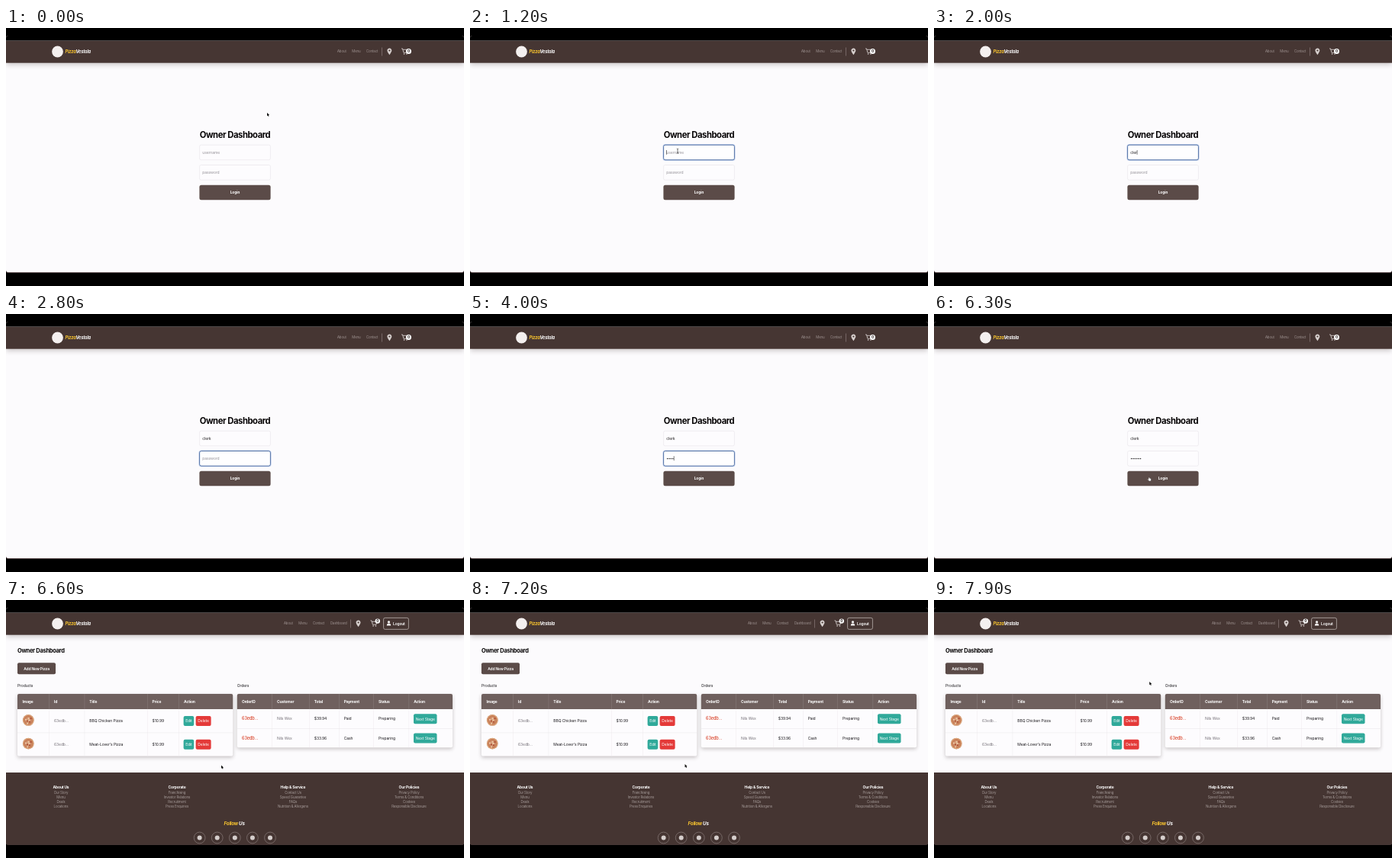
These frames come from a looping animation (600 px wide and 338 px high, 8 s). An HTML page with a canvas:

```html
<!DOCTYPE html>
<html lang="en">
<head>
<meta charset="utf-8">
<title>Pizza shop dashboard</title>
<style>
html, body { margin: 0; width: 100%; height: 100%; overflow: hidden; background: #000; }
canvas { display: block; width: 100vw; height: 100vh; }
</style>
</head>
<body>
<canvas id="stage"></canvas>
<script>
const W = 600, H = 338, LOOP = 8000;
const canvas = document.getElementById('stage');
const ctx = canvas.getContext('2d');
const ratio = window.devicePixelRatio || 1;
canvas.width = W * ratio;
canvas.height = H * ratio;

const PAPER = '#fcfbfd', BROWN = '#463633', BUTTON = '#5b4b48', HEAD = '#6f605e';
const YELLOW = '#fbc62f', TEAL = '#30a99a', RED = '#e43a39', SOFT = '#b9afad';

// Timeline, in ms
const FOCUS_USER = 1000, FOCUS_PASS = 2300, BLUR = 6200, PAGE_CHANGE = 6600;
const USER = 'clerk';
const USER_KEYS = [1500, 1700, 1800, 2000, 2100];
const PASS_KEYS = [3200, 3500, 3800, 4000, 4300, 5200];
const BLINKS = [FOCUS_USER, ...USER_KEYS, FOCUS_PASS, ...PASS_KEYS.slice(0, 5), 5300];
const MOVES = [
  { from: 100, to: 900, a: [342, 111], b: [272, 161] },
  { from: 5600, to: 6200, a: [272, 161], b: [282, 216.5] },
  { from: 7200, to: 7900, a: [281.5, 215], b: [282.2, 107] }
];

const typed = (keys, t) => keys.filter(k => k <= t).length;

function rect(x, y, w, h, color) {
  ctx.fillStyle = color;
  ctx.fillRect(x, y, w, h);
}

function box(x, y, w, h, r, fill, stroke, line = 0.5) {
  ctx.beginPath();
  ctx.roundRect(x, y, w, h, r);
  if (fill) { ctx.fillStyle = fill; ctx.fill(); }
  if (stroke) { ctx.strokeStyle = stroke; ctx.lineWidth = line; ctx.stroke(); }
}

function disc(x, y, r, fill, stroke, line = 0.5) {
  ctx.beginPath();
  ctx.arc(x, y, r, 0, Math.PI * 2);
  if (fill) { ctx.fillStyle = fill; ctx.fill(); }
  if (stroke) { ctx.strokeStyle = stroke; ctx.lineWidth = line; ctx.stroke(); }
}

function path(points, fill, stroke, line = 0.6) {
  ctx.beginPath();
  points.forEach(([x, y], i) => i ? ctx.lineTo(x, y) : ctx.moveTo(x, y));
  if (fill) { ctx.closePath(); ctx.fillStyle = fill; }
  if (stroke) { ctx.strokeStyle = stroke; ctx.lineWidth = line; ctx.stroke(); }
  if (fill) ctx.fill();
}

// Draws text and returns its width
function text(s, x, y, color, { size = 5, weight = 400, align = 'left', italic = false } = {}) {
  ctx.font = `${italic ? 'italic ' : ''}${weight} ${size}px Inter, sans-serif`;
  ctx.letterSpacing = `${-size * (weight > 500 ? 0.04 : 0.02)}px`;
  ctx.textAlign = align;
  ctx.fillStyle = color;
  ctx.fillText(s, x, y);
  return ctx.measureText(s).width;
}

function withShadow(blur, dy, alpha, draw) {
  ctx.save();
  ctx.shadowColor = `rgba(40, 25, 25, ${alpha})`;
  ctx.shadowBlur = blur * ratio;
  ctx.shadowOffsetY = dy * ratio;
  draw();
  ctx.restore();
}

function pin(x, y) {
  ctx.beginPath();
  ctx.arc(x, y - 1.2, 2.9, Math.PI * 0.88, Math.PI * 0.12);
  ctx.quadraticCurveTo(x + 1.8, y + 2, x, y + 4.5);
  ctx.quadraticCurveTo(x - 1.8, y + 2, x - 2.8, y);
  ctx.fillStyle = '#d8d1cf';
  ctx.fill();
  disc(x, y - 1.2, 1.1, BROWN);
}

function cart(x, y) {
  path([[x, y], [x + 1.5, y], [x + 2.9, y + 5.2], [x + 7.5, y + 5.2], [x + 8.5, y + 1.3], [x + 2, y + 1.3]], null, '#e4dedc', 0.8);
  disc(x + 3.6, y + 7, 0.8, '#e4dedc');
  disc(x + 6.9, y + 7, 0.8, '#e4dedc');
}

function badge(x, y, r) {
  disc(x, y, r, '#fff');
  text('0', x, y + 1.7, '#2b2120', { size: 4.7, weight: 700, align: 'center' });
}

function header(signedIn) {
  withShadow(7, 2, 0.28, () => rect(0, 16.5, W, 29.2, BROWN));
  rect(0, 0, W, 16.5, '#000');
  disc(67.5, 31, 7.4, '#f4f0ef');
  const brand = { size: 5.65, weight: 700, italic: true };
  const w = text('Pizza', 77.5, 33, YELLOW, brand);
  text('Vestola', 77.5 + w, 33, '#fff', brand);

  const shift = signedIn ? -70 : 0;
  const nav = { size: 4.4, weight: 300 };
  [['About', 434], ['Menu', 453.3], ['Contact', 472]].forEach(([s, x]) => text(s, x + shift, 32.4, SOFT, nav));
  if (signedIn) text('Dashboard', 425, 32.4, SOFT, nav);
  const line = signedIn ? 451.2 : 492;
  rect(line, 25.5, 0.6, 11, '#948886');
  pin(line + 10.4, 30.7);
  cart(signedIn ? 477.5 : 518, 27);
  if (!signedIn) return badge(527.5, 30.6, 3.5);
  badge(486.8, 27.6, 3.2);
  box(494.6, 23.4, 32.8, 15, 2, null, '#ded8d6', 0.6);
  disc(501.5, 28.9, 1.6, '#fff');
  box(498.8, 30.9, 5.4, 2.7, [2, 2, 0.5, 0.5], '#fff');
  text('Logout', 507, 32.7, '#fff', { weight: 600 });
}

function field(y, focused) {
  if (focused) {
    box(253.3, y - 0.2, 93.4, 20, 2.6, null, 'rgba(80, 125, 210, .3)', 1.8);
    box(253.6, y, 92.8, 19.6, 2.3, '#fefeff', '#40639b', 0.9);
  } else {
    box(253.6, y, 92.8, 19.6, 2, '#fdfcfe', '#e6e3e8', 0.6);
  }
}

function login(t) {
  const onUser = t >= FOCUS_USER && t < FOCUS_PASS;
  const onPass = t >= FOCUS_PASS && t < BLUR;
  const name = USER.slice(0, typed(USER_KEYS, t));
  const dots = typed(PASS_KEYS, t);
  header(false);
  text('Owner Dashboard', 300, 144.4, '#080607', { size: 11.25, weight: 700, align: 'center' });
  field(153.2, onUser);
  field(179.5, onPass);

  const nameWidth = text(name || 'username', 257.3, 164.8, name ? '#1c1a1c' : '#97949a');
  if (!dots) text('password', 257.3, 191, '#97949a');
  for (let i = 0; i < dots; i++) disc(258.6 + i * 2.38, 189.4, 0.75, '#1c1a1c');

  const last = BLINKS.filter(b => b <= t).pop();
  if ((onUser || onPass) && (t - last) % 1000 < 500) {
    const x = 257.3 + (onUser ? (name ? nameWidth : 0) : dots * 2.38);
    rect(x, onUser ? 160 : 186.2, 0.6, 5.8, '#222');
  }
  box(253.4, 205.7, 93.2, 19.6, 2.5, BUTTON);
  text('Login', 300, 217.4, '#fff', { weight: 700, align: 'center' });
}

function pizza(x, y) {
  const g = ctx.createRadialGradient(x, y, 1, x, y, 7.6);
  g.addColorStop(0, '#d9a07c');
  g.addColorStop(0.7, '#c57a54');
  g.addColorStop(0.85, '#e0ab7c');
  g.addColorStop(1, '#b9744f');
  disc(x, y, 7.4, g);
  for (let i = 0; i < 7; i++) {
    const a = i * 2.4, r = 1.2 + i * 0.55;
    disc(x + Math.cos(a) * r, y + Math.sin(a) * r, 1, i % 2 ? '#a9482f' : '#efd0ae');
  }
}

function pill(s, x, y, w, color) {
  box(x, y, w, 13, 2, color);
  text(s, x + w / 2, y + 8.3, '#fff', { align: 'center' });
}

function table(x, cols, heads, rowH) {
  const h = 20 + rowH * 2;
  withShadow(5, 2, 0.25, () => box(x, 123, 282.2, h, 2, '#fdfcfe'));
  box(x, 123, 282.2, 20, [2, 2, 0, 0], HEAD);
  cols.slice(1).forEach(c => {
    rect(c - 6.6, 123, 0.5, 20, '#8b7f7d');
    rect(c - 6.6, 143, 0.5, rowH * 2, '#eeebef');
  });
  rect(x, 143 + rowH, 282.2, 0.5, '#e6e3e7');
  heads.forEach((s, i) => text(s, cols[i], 134.9, '#fff', { weight: 700 }));
}

function products() {
  const cols = [21.6, 63.1, 109.3, 191.6, 233];
  table(15, cols, ['Image', 'Id', 'Title', 'Price', 'Action'], 30.7);
  ['BBQ Chicken Pizza', "Meat-Lover's Pizza"].forEach((s, i) => {
    const y = 158.4 + i * 30.7;
    pizza(29.3, y - 1);
    text('63edb...', cols[1], y + 1.8, '#77737a');
    text(s, cols[2], y + 1.8, '#18161a');
    text('$10.99', cols[3], y + 1.8, '#18161a');
    pill('Edit', 232.6, y - 6.4, 13.6, TEAL);
    pill('Delete', 248.6, y - 6.4, 20, RED);
  });
}

function orders() {
  const cols = [309, 354.9, 403.8, 442.7, 488, 534.2];
  table(302.8, cols, ['OrderID', 'Customer', 'Total', 'Payment', 'Status', 'Action'], 25.1);
  [['$39.94', 'Paid'], ['$33.96', 'Cash']].forEach(([total, pay], i) => {
    const y = 155.6 + i * 25.2;
    text('63edb...', cols[0], y + 1.8, '#d9452c', { size: 5.6, weight: 500 });
    text('Nils Wex', cols[1], y + 1.8, '#77737a');
    [total, pay, 'Preparing'].forEach((s, k) => text(s, cols[k + 2], y + 1.8, '#18161a'));
    pill('Next Stage', 534, y - 6.4, 30.5, TEAL);
  });
}

function footer() {
  rect(0, 226, W, 94.6, '#453532');
  const groups = [
    ['About Us', 'Our Story', 'Menu', 'Deals', 'Locations'],
    ['Corporate', 'Franchising', 'Investor Relations', 'Recruitment', 'Press Enquiries'],
    ['Help & Service', 'Contact Us', 'Speed Guarantee', 'FAQs', 'Nutrition & Allergens'],
    ['Our Policies', 'Privacy Policy', 'Terms & Conditions', 'Cookies', 'Responsible Disclosure']
  ];
  groups.forEach(([title, ...links], i) => {
    const x = 72 + i * 152;
    text(title, x, 246.8, '#fff', { weight: 700, align: 'center' });
    links.forEach((s, k) => text(s, x, 253.6 + k * 6.2, '#c3bab8', { size: 4.4, weight: 300, align: 'center' }));
  });
  const follow = { size: 6.25, weight: 700, italic: true };
  const w = text('Follow ', 285.6, 295.3, YELLOW, follow);
  text('Us', 285.6 + w, 295.3, '#fff', follow);
  for (let i = 0; i < 5; i++) {
    const x = 253.6 + i * 23.1;
    disc(x, 311.5, 7.4, null, '#958987', 0.6);
    disc(x, 311.5, 3, '#d5cecc');
  }
}

function dashboard() {
  header(true);
  text('Owner Dashboard', 15, 68.8, '#080607', { size: 7.5, weight: 700 });
  box(15, 82.3, 50, 15, 2, BUTTON);
  text('Add New Pizza', 40, 91.6, '#fff', { weight: 600, align: 'center' });
  text('Products', 15, 114, '#18161a');
  text('Orders', 302.8, 114, '#18161a');
  products();
  orders();
  footer();
}

function pointer(t) {
  if (t >= USER_KEYS[0] && t < 5600) return;
  const move = MOVES.filter(m => t >= m.from).pop() || MOVES[0];
  const u = Math.min(1, Math.max(0, (t - move.from) / (move.to - move.from)));
  const e = u * u * (3 - 2 * u);
  const [x, y] = move.a.map((a, i) => a + (move.b[i] - a) * e);
  const within = (top, bottom) => t < PAGE_CHANGE && x > 253 && x < 347 && y > top && y < bottom;

  if (within(153, 173) || within(179, 199)) {
    path([[x - 1.2, y - 3], [x, y - 2.4], [x + 1.2, y - 3]], null, '#333', 0.6);
    path([[x, y - 2.4], [x, y + 2.8]], null, '#333', 0.7);
    path([[x - 1.2, y + 3.2], [x, y + 2.7], [x + 1.2, y + 3.2]], null, '#333', 0.6);
  } else if (within(205.7, 225.3)) {
    box(x - 0.9, y - 1.2, 3.2, 3.6, 1, '#fff', '#222', 0.4);
    box(x - 0.6, y - 2.2, 1, 2.8, 0.5, '#fff');
    path([[x - 0.9, y + 1.3], [x - 1.9, y]], null, '#fff', 0.8);
  } else {
    const shape = [[0, 0], [0, 4.3], [1, 3.5], [1.7, 5], [2.5, 4.6], [1.9, 3.2], [3.1, 3.1]];
    path([...shape, shape[0]].map(([dx, dy]) => [x + dx, y + dy]), '#111', '#fff', 0.7);
  }
}

function draw(t) {
  ctx.setTransform(ratio, 0, 0, ratio, 0, 0);
  rect(0, 0, W, H, '#000');
  ctx.save();
  box(0, 10, W, 311, 3, '#4b3b3d');
  ctx.clip();
  box(0, 10, W, 310, 3, PAPER);
  if (t < PAGE_CHANGE) login(t); else dashboard();
  pointer(t);
  ctx.restore();
}

function tick() {
  const t = performance.now() % LOOP;
  draw(Math.floor(t / 100) * 100);
  requestAnimationFrame(tick);
}
tick();
</script>
</body>
</html>
```
